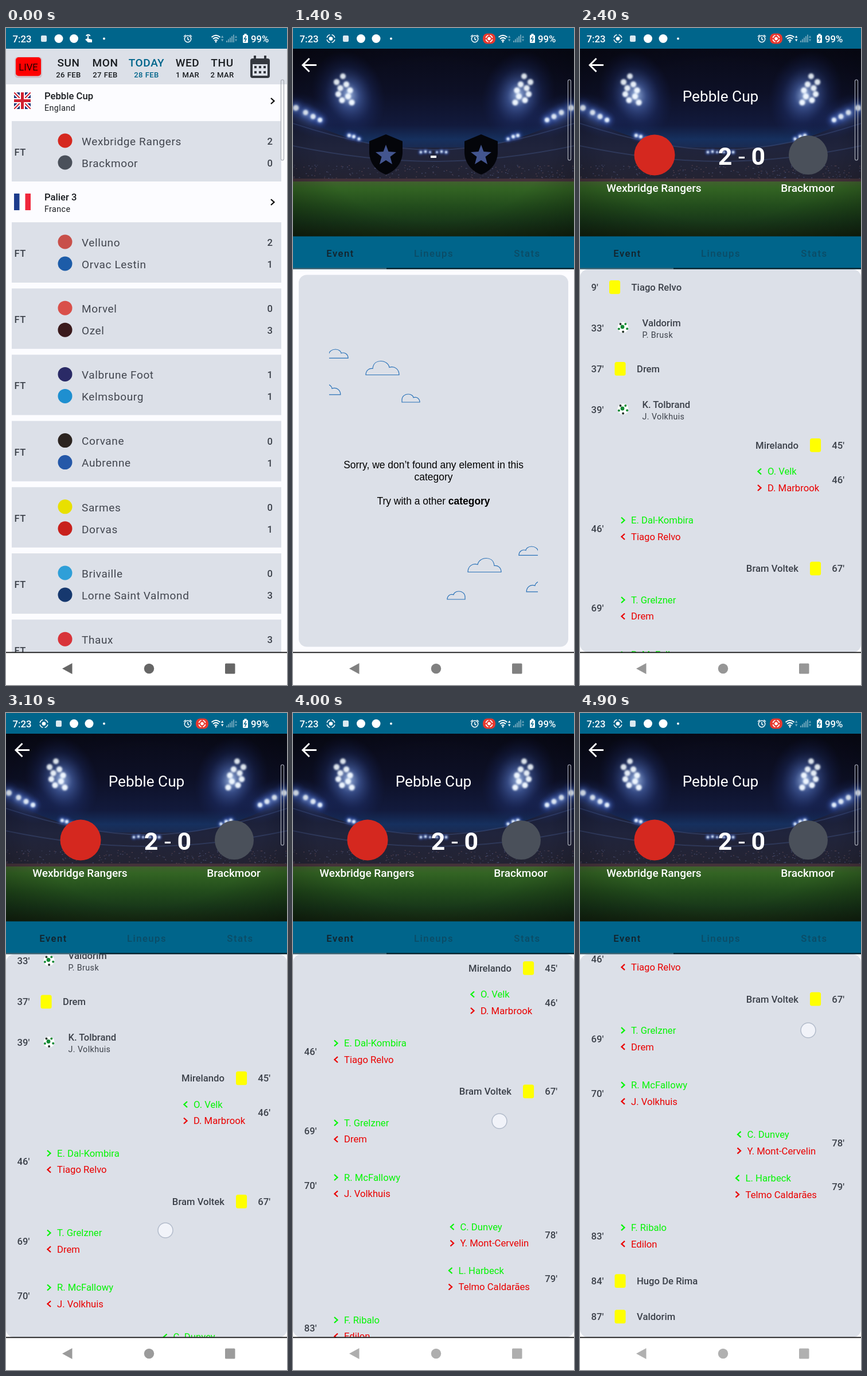
Animation, 490 px wide and 1143 px high, one loop 5000 ms. Source, as an HTML page:

```html
<!DOCTYPE html>
<html lang="en">
<head>
<meta charset="utf-8">
<title>Football scores</title>
<style>
html, body { margin: 0; width: 100%; height: 100%; overflow: hidden; background: #fcfcff; }
svg { display: block; width: 100vw; height: 100vh; font-family: Roboto, sans-serif; }
text { white-space: pre; }
.mid { text-anchor: middle; }
.end { text-anchor: end; }
.bold { font-weight: 500; }
.name { letter-spacing: .6px; }
.small { letter-spacing: .4px; }
.tab { letter-spacing: 1.5px; font-weight: 500; }
.line { fill: none; }
.empty { font-family: "Liberation Sans", sans-serif; }
</style>
</head>
<body>
<svg id="stage" viewBox="0 0 490 1143"></svg>
<script>
const stage = document.getElementById('stage');
const INK = '#3c414a', PANEL = '#dce0e8', BLUE = '#00658b';

// Text is placed by the vertical centre of its capitals.
const text = (x, y, s, size, cls = '', fill = INK) =>
  `<text x="${x}" y="${y + size * .356}" font-size="${size}" class="${cls}" fill="${fill}">${s}</text>`;
const rect = (x, y, w, h, fill, r = 0, more = '') =>
  `<rect x="${x}" y="${y}" width="${w}" height="${h}" rx="${r}" fill="${fill}" ${more}/>`;
const disc = (x, y, r, fill, more = '') => `<circle cx="${x}" cy="${y}" r="${r}" fill="${fill}" ${more}/>`;
const line = (d, color, width = 2, more = '') =>
  `<path class="line" d="${d}" stroke="${color}" stroke-width="${width}" ${more}/>`;
const group = (id, body, more = '') => `<g id="${id}" ${more}>${body}</g>`;
const chevron = (x, y, dir, color) =>
  line(`M${x - dir * 3},${y - 5}l${dir * 5.5},5l${-dir * 5.5},5`, color, 2.3);
const mirror = (body, dy = 0) => body + `<g transform="translate(490 ${dy}) scale(-1 1)">${body}</g>`;
const gradient = (id, stops) => `<linearGradient id="${id}" x2="0" y2="1">${
  stops.map(([at, c]) => `<stop offset="${at}" stop-color="${c}"/>`).join('')}</linearGradient>`;

const defs = `<defs>
  ${gradient('sky', [[0, '#090a18'], [.4, '#0d1026'], [.7, '#121a3c'], [.83, '#16305e'], [.9, '#1a2b52'], [1, '#14182c']])}
  ${gradient('stand', [[0, '#151a34'], [.5, '#20243c'], [1, '#242331']])}
  ${gradient('grass', [[0, '#41602f'], [.12, '#336423'], [.45, '#224c1c'], [.75, '#183719'], [1, '#152610']])}
  <radialGradient id="glow"><stop stop-color="#b8d4ff" stop-opacity=".85"/>
    <stop offset=".3" stop-color="#5c80d8" stop-opacity=".5"/>
    <stop offset=".65" stop-color="#2c479c" stop-opacity=".22"/>
    <stop offset="1" stop-color="#1c2f78" stop-opacity="0"/></radialGradient>
  <radialGradient id="shade" r=".75"><stop offset=".55" stop-opacity="0"/><stop offset="1" stop-opacity=".4"/></radialGradient>
  <filter id="soft" x="-50%" y="-50%" width="200%" height="200%"><feGaussianBlur stdDeviation="1.5"/></filter>
  <clipPath id="listClip"><rect y="98" width="490" height="988"/></clipPath>
  <clipPath id="photoClip"><rect y="36" width="490" height="327"/></clipPath>
  <clipPath id="eventClip"><rect y="420" width="490" height="666" rx="14"/></clipPath>
  <clipPath id="cloudClip"><rect x="63" y="429" width="364" height="647"/></clipPath>
  <clipPath id="flagClip"><rect width="29" height="29"/></clipPath>
</defs>`;

// ---- Match list ----
const days = [['SUN', '26 FEB', 109], ['MON', '27 FEB', 173], ['TODAY', '28 FEB', 245],
  ['WED', '1 MAR', 316.5], ['THU', '2 MAR', 377]];

const matches = [
  [162, 'Wexbridge Rangers', 2, '#d5281f', 'Brackmoor', 0, '#4a505a'],
  [338, 'Velluno', 2, '#c8504a', 'Orvac Lestin', 1, '#1d5ca8'],
  [453.2, 'Morvel', 0, '#d9504a', 'Ozel', 3, '#3a1a1c'],
  [568.4, 'Valbrune Foot', 1, '#2a2a66', 'Kelmsbourg', 1, '#1e8fd0'],
  [683.6, 'Corvane', 0, '#2c2420', 'Aubrenne', 1, '#2558a8'],
  [798.8, 'Sarmes', 0, '#e8e000', 'Dorvas', 1, '#c8201c'],
  [914, 'Brivaille', 0, '#2f9fd8', 'Lorne Saint Valmond', 3, '#16386e'],
  [1029.2, 'Thaux', 3, '#d8343a', 'Gresnil', 0, '#2b6a3c']];

const team = (y, name, goals, color) =>
  disc(103, y - 1, 12.5, color) + text(132, y, name, 19.05, 'name', '#42464f') +
  text(465, y, goals, 16.67, 'bold end');

const matchCard = ([y, home, hg, hc, away, ag, ac]) =>
  rect(10, y, 470, 105, PANEL) + text(14.5, y + 54, 'FT', 16.67, 'bold small') +
  team(y + 35, home, hg, hc) + team(y + 73, away, ag, ac);

const league = (y, name, country) =>
  text(67, y - 9, name, 16.67, 'bold', '#191c20') + text(67, y + 12, country, 14.3, 'small', '#191c20') +
  chevron(465, y, 1, '#111');

const unionFlag = `<g transform="translate(14 112)" clip-path="url(#flagClip)">${rect(0, 0, 29, 29, '#1c3578')}
  ${line('M0,0L29,29M29,0L0,29', '#fff', 6)}${line('M0,0L29,29M29,0L0,29', '#d02030', 2)}
  ${line('M14.5,0V29M0,14.5H29', '#fff', 9)}${line('M14.5,0V29M0,14.5H29', '#d02030', 5)}</g>`;
const tricolour = rect(14, 288, 29, 29, '#fff') + rect(14, 288, 9.5, 29, '#1d3c8c') + rect(33.5, 288, 9.5, 29, '#f0283c');

const calendar = rect(426, 53, 34, 34, '#34383f', 4) + rect(432, 48, 4, 8, '#34383f') + rect(450, 48, 4, 8, '#34383f') +
  rect(430, 63, 26, 20, PANEL) +
  [0, 1, 2].map(i => rect(433 + i * 8, 66, 4, 4, '#34383f') + rect(433 + i * 8, 75, 4, 4, '#34383f')).join('');

const list = group('list',
  rect(0, 36, 490, 1050, '#fcfcff') + rect(0, 36, 490, 62, PANEL) +
  rect(15, 50, 48, 37, '#c3a5ad', 6, 'opacity=".5"') + rect(17, 51, 44, 32.5, '#f00', 5) +
  text(39, 68.5, 'LIVE', 16.67, 'mid', '#200') +
  days.map(([day, date, x]) => {
    const color = day === 'TODAY' ? BLUE : '#191c20';
    return text(x, 60, day, 19.05, 'mid bold name', color) + text(x, 81, date, 13.1, 'mid bold small', color);
  }).join('') + calendar +
  `<g clip-path="url(#listClip)">${unionFlag}${tricolour}
   ${league(127, 'Pebble Cup', 'England')}${league(303, 'Palier 3', 'France')}${matches.map(matchCard).join('')}</g>`);

// ---- Stadium header ----
const roofLamps = [[5, 139, 5], [22, 147, 4.5], [35, 154, 4.5], [47, 160, 4], [98, 187, 3], [106, 189, 3],
  [115, 193, 2.5], [223, 216, 2], [231, 215, 2], [239, 216, 1.5]];
let lamps = disc(87, 84, 5, '#eef6ff');
for (let row = 0; row < 4; row++)
  for (let col = 0; col < 2; col++)
    lamps += disc(76 + col * 17 + row * 1.5 + row % 2 * 5, 94 + row * 10.5 + col * 4, 5.2, '#eef6ff');
lamps += roofLamps.map(([x, y, r]) => disc(x, y, r, '#e8f2ff')).join('');

const floodlight =
  `<ellipse cx="97" cy="116" rx="62" ry="78" fill="url(#glow)" transform="rotate(-20 97 116)"/>
  <ellipse cx="25" cy="152" rx="65" ry="34" fill="url(#glow)" opacity=".6" transform="rotate(24 25 152)"/>` +
  roofLamps.map(([x, y, r]) => disc(x, y, r * 4, 'url(#glow)')).join('') +
  `<g filter="url(#soft)">${lamps}</g>`;

let crowd = '', seed = 7;
const random = () => (seed = seed * 16807 % 2147483647) / 2147483647;
for (let i = 0; i < 220; i++) {
  const x = random() * 490, y = 238 + random() * 24;
  crowd += rect(x.toFixed(1), y.toFixed(1), 2, 1.3, ['#50404c', '#424868', '#343850'][i % 3]);
}

const photo = `<g clip-path="url(#photoClip)">${rect(0, 36, 490, 190, 'url(#sky)')}
  <path d="M0,150L60,178Q140,210 200,208H290Q350,210 430,178L490,150V270H0Z" fill="url(#stand)"/>
  ${line('M0,166Q140,212 245,212T490,166M0,205Q130,232 245,232T490,205', '#3c4c78', 2, 'opacity=".5"')}
  ${crowd}${mirror(floodlight)}
  ${rect(0, 262, 490, 6, '#44323a')}${rect(0, 267, 490, 96, 'url(#grass)')}
  ${rect(0, 36, 490, 327, 'url(#shade)')}</g>`;

const shield = x => `<g transform="translate(${x} 220)">
  <path d="M0,-35L29,-23V-4C29,14 17,29 0,35C-17,29 -29,14 -29,-4V-23Z" fill="#04050a"/>
  <path d="M0,-17L4.5,-5L18,-4L7.5,4L11,17L0,10L-11,17L-7.5,4L-18,-4L-4.5,-5Z" fill="#43558f"/></g>`;

// ---- Empty state ----
const smallCloud = 'M0,14V10C0,3 6,0 11,0C17,0 20,4 20,6C26,4 31,8 31,14Z';
const largeCloud = 'M0,24C0,16 6,12 12,13C13,3 20,0 26,0C34,0 40,5 41,11C50,8 58,14 58,24Z';
const cloud = (x, y, scale, d) => line(d, '#2a72b8', 1.2 / scale, `transform="translate(${x} ${y}) scale(${scale})"`);
const clouds = `<g class="drift">${cloud(190, 637, 1, smallCloud)}${cloud(127, 579.5, 1, largeCloud)}
  ${cloud(62, 559, 1.1, smallCloud)}${cloud(41, 619, 1.35, smallCloud)}</g>`;

const emptyState = group('emptyState',
  shield(162) + shield(328) + rect(240, 222, 10, 4, '#fff') +
  rect(10, 429.5, 470, 647, PANEL, 14) +
  `<g clip-path="url(#cloudClip)">${mirror(clouds, 343)}</g>` +
  text(245, 760, 'Sorry, we don’t found any element in this', 17.45, 'mid empty', '#000') +
  text(245, 781, 'category', 17.45, 'mid empty', '#000') +
  text(245, 823, 'Try with a other <tspan font-weight="700">category</tspan>', 17.45, 'mid empty', '#000'));

// ---- Match events ----
const yellow = (x, y) => rect(x, y - 12, 19.1, 23.8, '#ff0', 3.5);
const minute = (y, min, right) => text(right ? 461 : 19.5, y, min + "'", 16.67, right ? 'bold end' : 'bold');

const leftCard = (y, min, name) => {
  const x = min < 10 ? 51 : 60.5;
  return minute(y, min) + yellow(x, y) + text(x + 38.5, y, name, 16.67, 'bold');
};
const rightCard = (y, min, name) =>
  minute(y, min, true) + yellow(401, y) + text(381, y, name, 16.67, 'bold end');

const ball = y => disc(75, y, 9.5, '#fff') + disc(74, y - 1, 3.4, '#128a34') +
  [0, 1, 2, 3, 4].map(i => {
    const a = i * 1.257 + .3;
    return disc((75 + 7.5 * Math.cos(a)).toFixed(1), (y + 7.5 * Math.sin(a)).toFixed(1), 2, i % 2 ? '#26382c' : '#128a34');
  }).join('');
const goal = (y, min, scorer, assist) => minute(y, min) + ball(y - 1) +
  text(108.5, y - 9, scorer, 16.67, 'bold') + text(108.5, y + 11.5, assist, 14.3, 'small');

const swap = (y, min, on, off, x = 89) => {
  const right = x > 245, dir = right ? -1 : 1;
  return minute(y, min, right) +
    chevron(x - 14, y - 14.5, dir, '#05f505') + text(x, y - 14.5, on, 16.67, '', '#05f505') +
    chevron(x - 14, y + 14, -dir, '#ea0000') + text(x, y + 14, off, 16.67, '', '#ea0000');
};

const events = [
  leftCard(451, 9, 'Tiago Relvo'),
  goal(522, 33, 'Valdorim', 'P. Brusk'),
  leftCard(593, 37, 'Drem'),
  goal(664, 39, 'K. Tolbrand', 'J. Volkhuis'),
  rightCard(726, 45, 'Mirelando'),
  swap(786, 46, 'O. Velk', 'D. Marbrook', 327),
  swap(871, 46, 'E. Dal-Kombira', 'Tiago Relvo'),
  rightCard(940.5, 67, 'Bram Voltek'),
  swap(1009.5, 69, 'T. Grelzner', 'Drem'),
  swap(1104.5, 70, 'R. McFallowy', 'J. Volkhuis'),
  swap(1190.5, 78, 'C. Dunvey', 'Y. Mont-Cervelin', 291.5),
  swap(1266.5, 79, 'L. Harbeck', 'Telmo Caldarães', 288.5),
  swap(1352.5, 83, 'F. Ribalo', 'Edilon'),
  leftCard(1431, 84, 'Hugo De Rima'),
  leftCard(1493, 87, 'Valdorim')];

const matchView = group('matchView',
  text(245, 119, 'Pebble Cup', 26.2, 'mid', '#fff') +
  disc(130, 221, 35.5, '#d5281f') + disc(398, 221, 34, '#4a505a') +
  `<g font-weight="700">${text(282, 222.5, '2 <tspan font-weight="400">-</tspan> 0', 42.9, 'mid', '#fff')}</g>` +
  text(129, 278, 'Wexbridge Rangers', 19.05, 'mid bold', '#fff') +
  text(397, 278, 'Brackmoor', 19.05, 'mid bold', '#fff') +
  rect(0, 420, 490, 666, PANEL, 14) +
  `<g clip-path="url(#eventClip)">${group('events', events.join(''))}</g>`);

const detail = group('detail',
  rect(0, 36, 490, 1050, '#fcfcff') + photo +
  line('M41,64.5H18M28.5,53L17,64.5L28.5,76', '#fff', 3) +
  rect(0, 362.5, 490, 57, BLUE) + rect(0, 417.5, 163, 2, '#46616c') + rect(163, 417.5, 327, 2, '#08161c') +
  text(82.5, 392, 'Event', 16.67, 'mid tab', '#14222a') +
  text(245.5, 392, 'Lineups', 16.67, 'mid tab', '#0b4c66') +
  text(408.5, 392, 'Stats', 16.67, 'mid tab', '#0b4c66') +
  emptyState + matchView);

// ---- System bars ----
const squareIcon = x => rect(x - 5, 13, 10, 11, '#dbe9f0', 2);
const brandDiscs = x => disc(x, 18.5, 7.5, '#fff') + disc(x + 26.5, 18.5, 7.5, '#fff');
const hand = line('M143,20V13.5M140,14a3.5,3.5 0 0 1 6.5,0', '#fff', 2) +
  '<path d="M142,18L150,20V25H143L138,20Z" fill="#fff"/>';
// Ring of four arcs with gaps on the axes, around a dot.
const recorder = (x, r) => disc(x, 18.5, r, 'none',
  `stroke="#fff" stroke-width="1.6" pathLength="40" stroke-dasharray="7 3" stroke-dashoffset="-1.5"`) +
  disc(x, 18.5, r * .48, '#fff');

const statusBar = rect(0, 0, 490, 36, BLUE) + text(11.5, 19, '7:23', 16.8, 'bold', '#fff') +
  group('idleIcons', squareIcon(66) + brandDiscs(92) + hand) +
  group('recordIcons', recorder(66, 7) + squareIcon(92) + brandDiscs(118.5) +
    rect(331, 9.5, 22, 18, '#e8392f', 8) + recorder(342, 5.8)) +
  disc(171, 18.5, 2, '#fff') +
  disc(317, 19, 5.7, 'none', 'stroke="#fff" stroke-width="1.5"') +
  line('M317,15.5V19.5L319.5,21M310,15L313.5,12M324,15L320.5,12', '#fff', 1.5) +
  line('M358.5,16Q366,9.5 373.5,16M361,19Q366,14.8 371,19M363.5,22Q366,19.5 368.5,22', '#fff', 2) +
  disc(366, 24, 1.4, '#fff') +
  group('traffic', '<path d="M375,17l2.2,-4l2.2,4ZM375,19.5l2.2,4l2.2,-4Z" fill="#fff"/>') +
  [0, 1, 2, 3, 4].map(i => rect(384 + i * 3, 22 - i * 2.6, 2, 3 + i * 2.6, '#6ba3b9')).join('') +
  '<path d="M399,17l2,-4l2,4ZM399,19.5l2,4l2,-4Z" fill="#6ba3b9"/>' +
  rect(413, 12, 9, 14, '#fff', 1.5) + rect(415.5, 10, 4, 3, '#fff') +
  line('M418.5,14L415.5,19H419L416.5,24', BLUE, 1.4) + text(427, 19, '99%', 16.8, 'bold', '#fff');

const navBar = rect(0, 1086, 490, 57, '#fff') + rect(0, 1085.5, 490, 1.8, '#111') +
  group('navIcons', '<path d="M98,1114.5L115.5,1105V1124Z"/><circle cx="249.5" cy="1114.5" r="8.7"/>' +
    '<rect x="382" y="1105.5" width="17.5" height="18" rx="1.5"/>');

stage.innerHTML = defs + list + detail + statusBar + navBar +
  rect(479.5, 90, 5, 140, 'none', 2.5, 'id="edge" stroke-width="1.2"') +
  disc(0, 0, 13, '#f1f3f9', 'id="touch" stroke="#b3bccb" stroke-width="1.5"');

// ---- Motion ----
const el = id => document.getElementById(id);
const show = (id, on) => el(id).style.display = on ? '' : 'none';
const drifting = stage.querySelectorAll('.drift');

// Linear interpolation through [time, value] keys, held at both ends.
function track(t, keys) {
  if (t <= keys[0][0]) return keys[0][1];
  for (let i = 1; i < keys.length; i++) {
    const [t0, a] = keys[i - 1], [t1, b] = keys[i];
    if (t <= t1) return a + (b - a) * (t - t0) / (t1 - t0);
  }
  return keys.at(-1)[1];
}

function render(t) {
  const loaded = t >= 1900, recording = t >= 200;
  show('idleIcons', !recording);
  show('recordIcons', recording);
  el('detail').setAttribute('opacity', track(t, [[200, 0], [500, 1]]));
  show('emptyState', !loaded);
  show('matchView', loaded);
  drifting.forEach(g => g.setAttribute('transform', `translate(${(t - 1400) * .161})`));

  const scroll = track(t, [[2600, 0], [3100, 90.5], [4000, 282], [4900, 442.8]]);
  el('events').setAttribute('transform', `translate(0 ${-scroll})`);
  show('touch', t >= 2500);
  el('touch').setAttribute('cx', track(t, [[2600, 240], [3100, 278], [4000, 360], [4900, 398]]));
  el('touch').setAttribute('cy', track(t, [[2500, 1002], [2600, 991], [3100, 900], [4000, 710], [4900, 552]]));

  el('traffic').setAttribute('opacity', t >= 2300 && t < 4500 ? 1 : .45);
  el('edge').setAttribute('stroke', t < 400 ? '#a5a9b0' : t < 1200 ? '#fff' : '#a9adb8');
  const grey = track(t, [[600, 102], [1400, 128], [2400, 150], [3100, 155], [4000, 174], [4900, 176]]);
  el('navIcons').setAttribute('fill', `rgb(${grey},${grey},${grey})`);
}

function tick() {
  render(Math.floor(performance.now() % 5000 / 100) * 100);
  requestAnimationFrame(tick);
}
tick();
</script>
</body>
</html>
```
